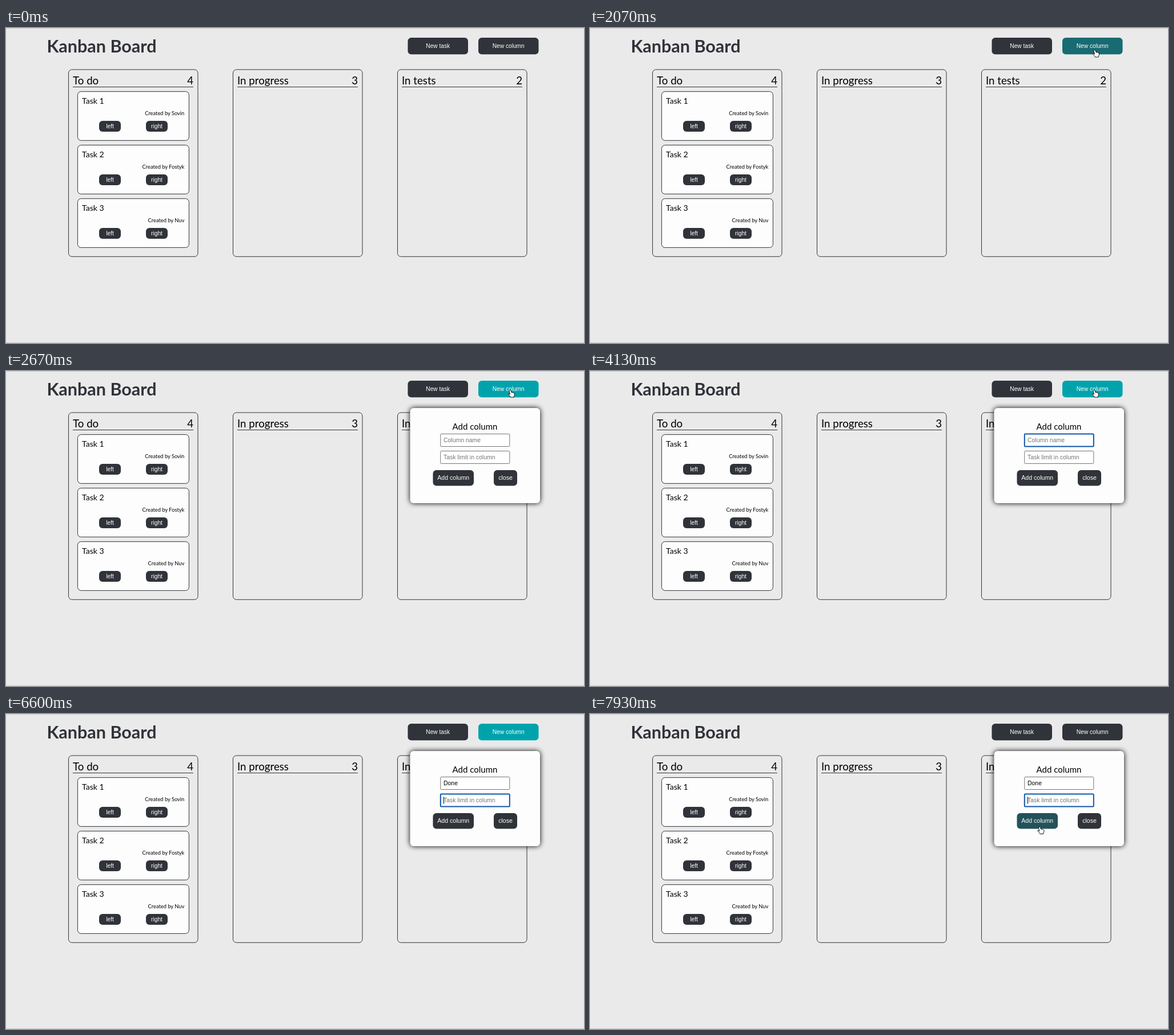
An HTML page that plays this animation: 1012 by 553 pixels, repeating every 8000 ms.

```html
<!DOCTYPE html>
<html lang="en">
<head>
<meta charset="utf-8">
<title>Kanban Board</title>
<style>
  html, body { margin: 0; width: 100%; height: 100%; overflow: hidden; background: #eaeaea; }
  svg { display: block; width: 1012px; height: 553px; }
  text { font-family: Lato, sans-serif; white-space: pre; }
  .ui { font-family: "Liberation Sans", Arial, sans-serif; }
</style>
</head>
<body>
<svg id="stage" viewBox="0 0 1012 553"></svg>
<script>
const LOOP = 8000;
const DARK = [48, 51, 57], TEAL = [0, 163, 172];
const INK = '#303339';

const stage = document.getElementById('stage');
const rgb = c => `rgb(${c.map(Math.round)})`;
const mix = (a, b, k) => a.map((v, i) => v + (b[i] - v) * k);
const clamp01 = k => k < 0 ? 0 : k > 1 ? 1 : k;

const rect = (x, y, w, h, r, fill, more = '') =>
  `<rect x="${x}" y="${y}" width="${w}" height="${h}" rx="${r}" fill="${fill}" ${more}/>`;
const text = (x, y, size, str, more = '') =>
  `<text x="${x}" y="${y}" font-size="${size}" ${more}>${str}</text>`;
const ui = (x, y, size, str, fill, more = '') =>
  text(x, y, size, str, `class="ui" fill="${fill}" ${more}`);
const button = (x, y, w, h, size, str, id = '') =>
  rect(x, y, w, h, 6, rgb(DARK), id && `id="${id}"`) +
  ui(x + w / 2, y + h / 2 + size * 0.35, size, str, '#fff', 'text-anchor="middle"');

const column = (x, name, limit) =>
  rect(x + .5, 73, 226.5, 328.3, 6, 'none', `stroke="${INK}"`) +
  text(x + 8, 99, 18.7, name) +
  text(x + 219, 99, 18.7, limit, 'text-anchor="end"') +
  `<path d="M${x + 8} 103.5h211" stroke="${INK}"/>`;

const card = (i, author) => `<g transform="translate(0 ${94 * i})">` +
  rect(125.4, 111.6, 195, 85.8, 6, '#fdfdfd', `stroke="${INK}"`) +
  text(133, 133, 14, `Task ${i + 1}`) +
  text(312.3, 153, 9.3, `Created by ${author}`, 'text-anchor="end"') +
  button(163, 163, 38, 19, 10.2, 'left') +
  button(245, 163, 38, 19, 10.2, 'right') + '</g>';

const field = (y, hint, id) =>
  rect(760.8, y + .5, 121, 22, 1.5, '#fff', `id="${id}" stroke="#767676"`) +
  ui(766, y + 15.2, 10.45, hint, '#757575', `id="${id}Text"`);

stage.innerHTML = `
  <defs><filter id="blur" x="-20%" y="-20%" width="140%" height="140%">
    <feGaussianBlur stdDeviation="4.6"/></filter></defs>` +
  rect(0, 0, 1012, 553, 0, '#eaeaea') +
  '<path d="M0 .5h1012M0 552.5h1012" stroke="#c9c9c9"/>' +
  text(71.5, 43, 30.5, 'Kanban Board', `font-weight="700" fill="${INK}"`) +
  button(703.5, 17, 105.5, 29.3, 10.2, 'New task') +
  button(827, 17, 105.5, 29.3, 10.2, 'New column', 'newCol') +
  column(109, 'To do', 4) + column(397, 'In progress', 3) + column(685, 'In tests', 2) +
  ['Sovin', 'Fostyk', 'Nuv'].map((name, i) => card(i, name)).join('') +
  '<g id="dialog">' +
    rect(707.5, 65, 227.5, 167, 6, '#000', 'filter="url(#blur)"') +
    rect(707.5, 65, 227.5, 167, 6, '#fdfdfd') +
    text(821, 103, 15, 'Add column', 'text-anchor="middle"') +
    field(110, 'Column name', 'name') +
    field(140, 'Task limit in column', 'limit') +
    button(747.5, 174, 71.5, 27.5, 10.6, 'Add column', 'add') +
    button(854, 174, 41, 27.5, 10.6, 'close') +
    '<path id="caret" stroke="#000" d="M766.5 115.5v12"/>' +
    '<g id="hints">' +
      rect(805, 139, 118.5, 61, 2.5, '#252528') +
      '<path d="M813 139.5L819.5 133.8Q821 132.6 822.5 133.8L829 139.5Z" fill="#252528"/>' +
      [160, 187].map(y => text(814, y, 9.8, 'Done',
        'fill="#f4f4f4" style="font-family:Inter,sans-serif"')).join('') +
    '</g>' +
  '</g>' +
  `<g id="pointer">
    <path id="arrow" d="M0 0V11.2L2.6 8.8L4.4 12.8L6.3 12L4.6 8.1H8Z" fill="#000" stroke="#fff" stroke-width=".8"/>
    <path id="hand" d="M-1.6 .8Q0 -.8 1 1L2 4.3Q3.5 3.4 4.2 4.6Q5.5 4 6 5.2Q7.4 4.9 7.5 6.6L7.3 9L6.2 11V12.6H.4L-.6 10.4L-3.5 7.6Q-3.9 6.3-2.4 6.4L-.5 7.6L-1.9 2.2Z"
      fill="#fff" stroke="#000" stroke-width=".9" stroke-linejoin="round"/>
    <path id="beam" d="M-2 -6Q0 -6 0 -4.5Q0 -6 2 -6M0 -4.5V4.5M-2 6Q0 6 0 4.5Q0 6 2 6" fill="none" stroke="#000" stroke-width=".9"/>
  </g>`;

const el = {};
stage.querySelectorAll('[id]').forEach(e => el[e.id] = e);
const show = (e, on) => e.setAttribute('display', on ? 'inline' : 'none');
const within = (t, spans) => spans.some(([a, b]) => t >= a && t < b);

// cubic-bezier(.25, .1, .25, 1)
function ease(x) {
  if (x <= 0) return 0;
  if (x >= 1) return 1;
  let lo = 0, hi = 1, u;
  for (let i = 0; i < 20; i++) {
    u = (lo + hi) / 2;
    if (.75 * u * (1 - u) + u ** 3 < x) lo = u; else hi = u;
  }
  return .3 * u * (1 - u) ** 2 + 3 * u * u * (1 - u) + u ** 3;
}
const hover = (t, start) => ease((t - start) / 500);

// time, x, y of the pointer's hot spot
const TRACK = [
  [1600, 1010, 132], [1730, 972, 88], [1900, 926, 48], [2070, 884, 38.5], [2270, 883, 33.5],
  [7030, 883, 33.5], [7150, 869, 48], [7270, 852, 77], [7470, 834, 112],
  [7670, 806, 160], [7840, 789, 187], [7930, 787.5, 198]
];
function pointerAt(t) {
  let i = 1;
  while (i < TRACK.length - 1 && TRACK[i][0] < t) i++;
  const [a, b] = [TRACK[i - 1], TRACK[i]];
  const k = clamp01((t - a[0]) / (b[0] - a[0]));
  return [a[1] + (b[1] - a[1]) * k, a[2] + (b[2] - a[2]) * k];
}

const KEYS = [4200, 4930, 5000, 5070];
const CARET = [[3070, 3660], [4200, 5570], [6070, 7100], [7600, 8000]];

function focus(box, on) {
  box.setAttribute('stroke', on ? '#0f56a8' : '#767676');
  box.setAttribute('stroke-width', on ? 2 : 1);
}

function draw(t) {
  el.newCol.setAttribute('fill', rgb(mix(DARK, TEAL, hover(t, 1925) - hover(t, 7150))));
  el.add.setAttribute('fill', rgb(mix(DARK, TEAL, hover(t, 7835))));

  const tabbed = t >= 6600;
  show(el.dialog, t >= 2670);
  focus(el.name, t >= 3070 && !tabbed);
  focus(el.limit, tabbed);

  const typed = KEYS.filter(k => t >= k).length;
  el.nameText.textContent = typed ? 'Done'.slice(0, typed) : 'Column name';
  el.nameText.setAttribute('fill', typed ? '#000' : '#757575');
  show(el.hints, typed && !tabbed);

  show(el.caret, within(t, CARET));
  const caretX = tabbed || !typed ? 0 : 1.7 + 5.85 * typed;
  el.caret.setAttribute('transform', `translate(${caretX} ${tabbed ? 30 : 0})`);

  const [x, y] = pointerAt(t);
  const inX = x > 760 && x < 882;
  const onField = t > 7000 && inX && (y > 110 && y < 133 || y > 140 && y < 163);
  const onButton = x > 827 && x < 932 && y < 47 || t > 7000 && x < 819 && y > 174;
  show(el.pointer, within(t, [[1600, 4200], [7030, LOOP]]));
  show(el.hand, onButton);
  show(el.beam, onField);
  show(el.arrow, !onButton && !onField);
  el.pointer.setAttribute('transform', `translate(${x} ${y})`);
}

const begin = performance.now();
function tick() {
  draw((performance.now() - begin) % LOOP);
  requestAnimationFrame(tick);
}
tick();
</script>
</body>
</html>
```
